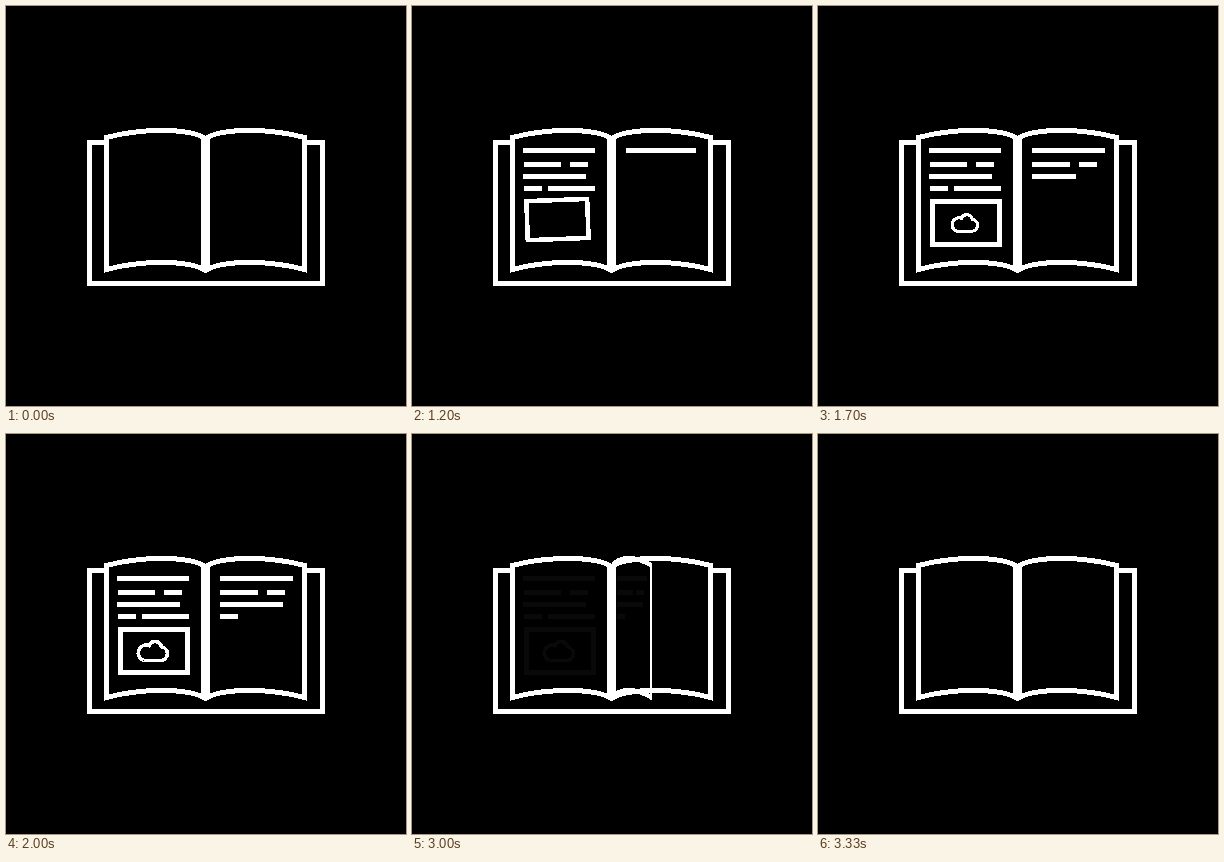
These frames come from a looping animation (400 by 400 pixels, 4010 ms). An HTML page:

```html
<!DOCTYPE html>
<html lang="en">
<head>
<meta charset="utf-8">
<title>Book</title>
<style>
  html, body { margin: 0; width: 100%; height: 100%; overflow: hidden; background: #000; }
  svg { display: block; width: 100vw; height: 100vh; }
</style>
</head>
<body>
<svg viewBox="0 0 400 400" fill="none" stroke="#fff" stroke-width="5" shape-rendering="crispEdges">
  <defs>
    <!-- one page, drawn to the right of the spine -->
    <path id="page" d="M1.8 131.5C18 122.3 64 122 99 131.5V263.5C64 254 18 254.3 1.8 263.5Z"/>
  </defs>
  <path d="M100 136.5H83.5V277.5H316.5V136.5H300"/>
  <use href="#page" transform="translate(199.5 0) scale(-1 1)"/>
  <use href="#page" transform="translate(199.5 0)"/>
  <g id="left">
    <rect id="frame" x="114.5" y="195.5" width="67" height="43"/>
    <path id="cloud" stroke-width="3.6" d="M137.5 226.5H155A6.9 6.9 0 0 0 155.5 212.8A6.6 6.6 0 0 0 143 211.5A7.75 7.75 0 0 0 137.5 226.5Z"/>
  </g>
  <g id="leaf">
    <use href="#page"/>
    <g id="right" transform="translate(-199.5 0)"></g>
  </g>
</svg>
<script>
const LOOP = 4010, SPINE = 199.5;
const WRITE = 200;                 // time to write one line
const TURN = 2817, TURN_TIME = 500;
const ROWS = [144.5, 158.5, 170.5, 182.5];

// page, row, x, width, start time
const LINES = [
  ['left', 0, 111, 72, 40],
  ['left', 1, 112, 37, 205],
  ['left', 1, 158, 18, 370],
  ['left', 2, 111, 63, 540],
  ['left', 3, 112, 18, 705],
  ['left', 3, 136, 47, 875],
  ['right', 0, 214, 73, 1042],
  ['right', 1, 214, 38, 1225],
  ['right', 1, 261, 18, 1411],
  ['right', 2, 214, 63, 1610],
  ['right', 3, 214, 18, 1800]
];

const $ = id => document.getElementById(id);
const left = $('left'), right = $('right'), leaf = $('leaf');
const frame = $('frame'), cloud = $('cloud');

const part = (t, start, time) => Math.min(1, Math.max(0, (t - start) / time));
const easeOut = p => 1 - (1 - p) ** 2;
const backOut = (p, s) => 1 + (s + 1) * (p - 1) ** 3 + s * (p - 1) ** 2;

const lines = LINES.map(([page, row, x, width, start]) => {
  const el = document.createElementNS('http://www.w3.org/2000/svg', 'path');
  $(page).appendChild(el);
  return { el, x, y: ROWS[row], width, start };
});

function pop(el, x, y, scale, angle) {
  el.style.display = scale > 0.001 ? '' : 'none';
  el.setAttribute('transform',
    `translate(${x} ${y}) rotate(${angle}) scale(${scale}) translate(${-x} ${-y})`);
}

function draw(t) {
  for (const l of lines) {
    const w = l.width * easeOut(part(t, l.start, WRITE));
    l.el.setAttribute('d', w > 0 ? `M${l.x} ${l.y}h${w}` : '');
  }

  const size = backOut(part(t, 1064, 520), 2.15);
  pop(frame, 112, 193, size, 23 * (size - 1));
  pop(cloud, 147, 217, backOut(part(t, 1585, 415), 1.7), 0);

  // the leaf swings half a turn about the spine
  const side = Math.cos(Math.PI * part(t, TURN, TURN_TIME));
  const ink = 1 - part(t, TURN + 20, 170);
  left.setAttribute('opacity', ink);
  right.setAttribute('opacity', ink);
  leaf.setAttribute('transform', `translate(${SPINE} 0) scale(${side} 1)`);
}

const begin = performance.now();
function tick() {
  draw((performance.now() - begin) % LOOP);
  requestAnimationFrame(tick);
}
draw(0);
requestAnimationFrame(tick);
</script>
</body>
</html>
```
